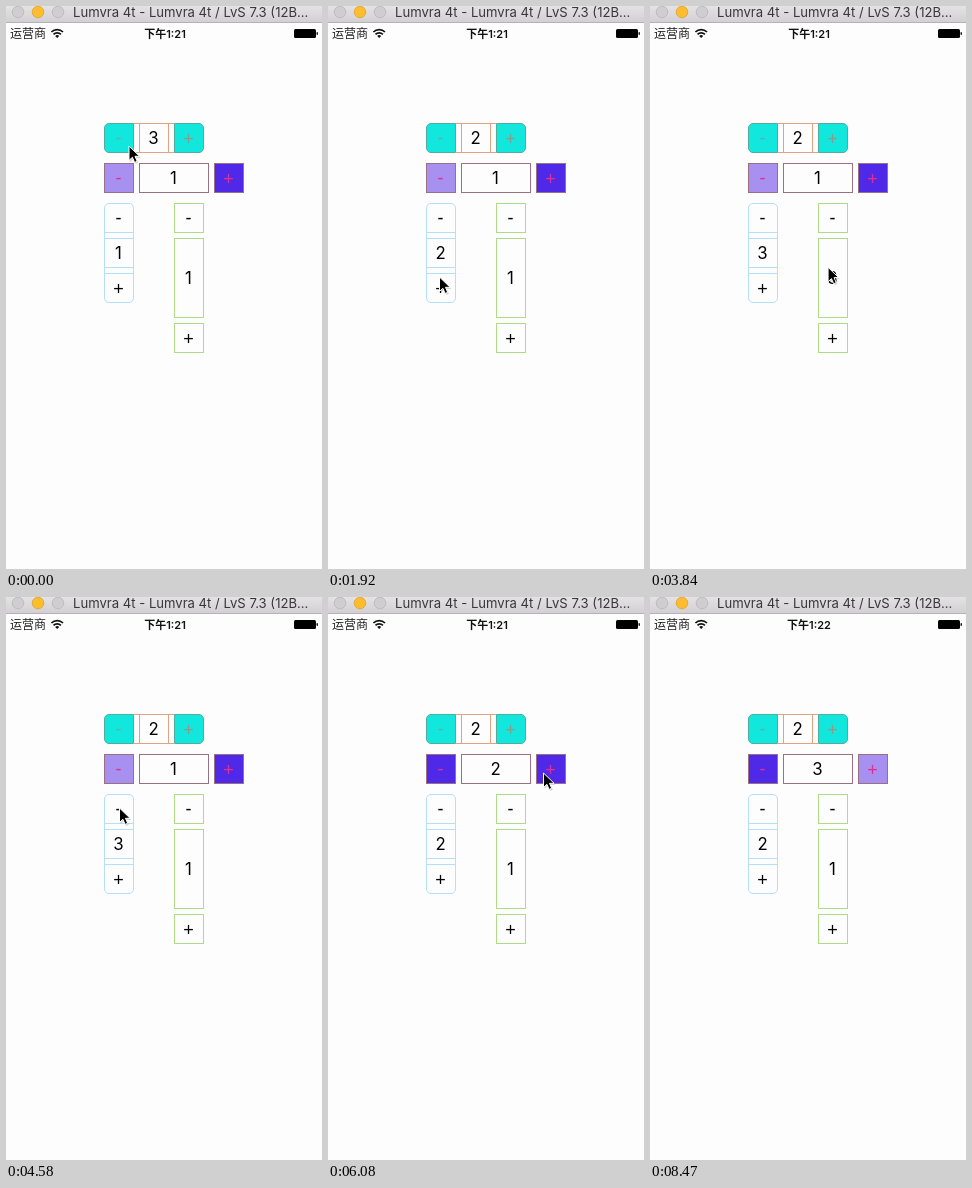
Recreate the animation shown at these times as an HTML page. Size 316x563 px, loop 8900 ms.

```html
<!DOCTYPE html>
<html lang="zh">
<head>
<meta charset="utf-8">
<title>Steppers</title>
<style>
  html, body { margin: 0; width: 100%; height: 100%; overflow: hidden; background: #fdfdfd; }
  svg { display: block; width: 316px; height: 563px; }
  .title { font: 13.1px Inter, sans-serif; fill: #383838; }
  .carrier { font: 12px "Noto Sans CJK SC", "Noto Sans CJK", sans-serif; fill: #222; }
  .clock { font: 600 11px Inter, "Noto Sans CJK SC", "Noto Sans CJK", sans-serif; fill: #111; text-anchor: middle; }
  .num { font: 16.8px Inter, sans-serif; text-anchor: middle; }
  .sign { font: 18px "Liberation Sans", Arial, sans-serif; text-anchor: middle; }
</style>
</head>
<body>
<svg viewBox="0 0 316 563">
  <defs>
    <linearGradient id="bar" x2="0" y2="1">
      <stop stop-color="#e4e2e4"/><stop offset="1" stop-color="#d2d0d2"/>
    </linearGradient>
  </defs>
  <rect width="316" height="563" fill="#fdfdfd"/>
  <rect width="316" height="16" fill="url(#bar)"/>
  <rect y="16" width="316" height="1" fill="#b4b2b4"/>
  <g stroke-width=".8">
    <circle cx="12" cy="6" r="5.8" fill="#cfcdcf" stroke="#b9b7b9"/>
    <circle cx="32" cy="6" r="5.8" fill="#fdbd2e" stroke="#e0a32a"/>
    <circle cx="52" cy="6" r="5.8" fill="#cfcdcf" stroke="#b9b7b9"/>
  </g>
  <text class="title" x="67" y="11">Lumvra 4t - Lumvra 4t / LvS 7.3 (12B...</text>

  <text class="carrier" x="4" y="32">运营商</text>
  <g fill="none" stroke="#111" stroke-width="1.7">
    <path d="M45.4 26a8.2 8.2 0 0 1 11.6 0M47.5 28.4a5.2 5.2 0 0 1 7.4 0"/>
    <path d="M51.2 31.9l-2-2a2.8 2.8 0 0 1 4 0z" fill="#111" stroke="none"/>
  </g>
  <text class="clock" id="clock" x="159" y="32"></text>
  <rect x="288" y="23" width="22" height="9" rx="1.5" fill="#000"/>
  <rect x="310.5" y="26" width="1.5" height="3" rx=".7" fill="#222"/>

  <g id="controls"></g>

  <g id="cursor">
    <path d="M1 1.5V16L4.4 13L6.6 18L9.4 16.8L7.2 12H11.8Z" opacity=".16"/>
    <path d="M0 0V14.4L3.4 11.3L5.6 16.4L8.2 15.3L6 10.3H10.6Z" stroke="#fff"/>
  </g>
</svg>
<script>
const LOOP = 8900, TICK = LOOP / 60;
const $ = id => document.getElementById(id);

function add(name, attrs, text = '') {
  const el = document.createElementNS('http://www.w3.org/2000/svg', name);
  for (const k in attrs) el.setAttribute(k, attrs[k]);
  el.textContent = text;
  return $('controls').appendChild(el);
}
const box = (x, y, w, h, stroke, fill = 'none', rx = 0) =>
  add('rect', { x: x + .5, y: y + .5, width: w - 1, height: h - 1, rx, stroke, fill });
const line = (d, stroke) => add('path', { d, stroke, fill: 'none' });
const num = (x, y) => add('text', { class: 'num', x, y: y + 6 });
const sign = (x, y, text, fill = '#000') =>
  add('text', { class: 'sign', x, y: y + (text === '+' ? 7.2 : 6.2), fill }, text);

// Joined horizontal stepper
const teal = '#12e7dd', rust = '#e0a382', olive = '#54ad9c';
const side = 'h24.5v29h-24.5a4.5 4.5 0 0 1-4.5-4.5v-20a4.5 4.5 0 0 1 4.5-4.5z';
line('M128 117.5H168M128 146.5H168M133.5 117V147M162.5 117V147', rust);
add('path', { d: 'M103 117.5' + side, fill: teal, stroke: olive });
add('path', { d: 'M103 117.5' + side, fill: teal, stroke: olive, transform: 'matrix(-1 0 0 1 296 0)' });
sign(112.5, 132, '-', '#5bb3a6');
sign(182.5, 132, '+', '#8c9c8c');
const joinedRow = { start: 3, text: num(147.5, 132) };

// Spaced horizontal stepper
const plum = '#9a7083', pink = '#dc3193', dark = '#5028e8', pale = '#a890f1';
const minus = box(98, 157, 30, 30, plum);
box(133, 157, 70, 30, plum);
const plus = box(208, 157, 30, 30, plum);
sign(112.5, 172, '-', pink);
sign(222.5, 172, '+', pink);
const spacedRow = { start: 1, text: num(167.5, 172) };

// Joined vertical stepper
const sky = '#b4dff6';
box(98, 197, 30, 100, sky, 'none', 4.5);
line('M98 226.5H128M98 232.5H128M98 267.5H128M98 261.5H128', sky);
sign(112.5, 212, '-');
sign(112.5, 282, '+');
const joinedColumn = { start: 1, text: num(112.5, 247) };

// Spaced vertical stepper
const green = '#aedb84';
box(168, 197, 30, 30, green);
box(168, 232, 30, 80, green);
box(168, 317, 30, 30, green);
sign(182.5, 212, '-');
sign(182.5, 332, '+');
const spacedColumn = { start: 1, text: num(182.5, 272) };

// The pointer eases to each stop, then may click a button there.
const stops = [
  { leave: 0, arrive: 1, x: 123, y: 140, on: joinedRow, step: -1, clicks: [150] },
  { leave: 150, arrive: 740, x: 114, y: 217 },
  { leave: 880, arrive: 1040, x: 112, y: 213 },
  { leave: 1330, arrive: 1780, x: 111.5, y: 271, on: joinedColumn, step: 1, clicks: [1920, 2370] },
  { leave: 2070, arrive: 2510, x: 114, y: 277 },
  { leave: 2510, arrive: 3100, x: 177.5, y: 329, on: spacedColumn, step: 1, clicks: [3400, 3550] },
  { leave: 3550, arrive: 3840, x: 178.5, y: 210, on: spacedColumn, step: -1, clicks: [3990, 4140] },
  { leave: 4140, arrive: 4430, x: 113.5, y: 211, on: joinedColumn, step: -1, clicks: [4730] },
  { leave: 4880, arrive: 5330, x: 116.5, y: 173 },
  { leave: 5480, arrive: 5930, x: 215.5, y: 176, on: spacedRow, step: 1, clicks: [6080, 6230] },
  { leave: 6530, arrive: 6830, x: 272, y: 480 }
];
const steppers = [joinedRow, spacedRow, joinedColumn, spacedColumn];

function pointer(t) {
  let { x, y } = stops[0];
  for (const s of stops) {
    const p = Math.min(1, Math.max(0, (t - s.leave) / (s.arrive - s.leave)));
    const e = p * p * (3 - 2 * p);
    x += (s.x - x) * e;
    y += (s.y - y) * e;
  }
  return [x, y];
}

function render(t) {
  for (const s of steppers) s.value = s.start;
  for (const { on, step, clicks = [] } of stops)
    if (on) on.value += step * clicks.filter(c => c <= t).length;
  for (const s of steppers) s.text.textContent = s.value;

  minus.setAttribute('fill', spacedRow.value === 1 ? pale : dark);
  plus.setAttribute('fill', spacedRow.value === 3 ? pale : dark);
  $('clock').textContent = t < 8470 ? '下午1:21' : '下午1:22';

  // The pointer is redrawn only once per tick
  const held = Math.floor((t + 10) / TICK) * TICK;
  $('cursor').setAttribute('transform', `translate(${pointer(held)})`);
  $('cursor').setAttribute('visibility', t < 6980 ? 'visible' : 'hidden');
}

const start = performance.now();
function frame() {
  render((performance.now() - start) % LOOP);
  requestAnimationFrame(frame);
}
frame();
</script>
</body>
</html>
```
